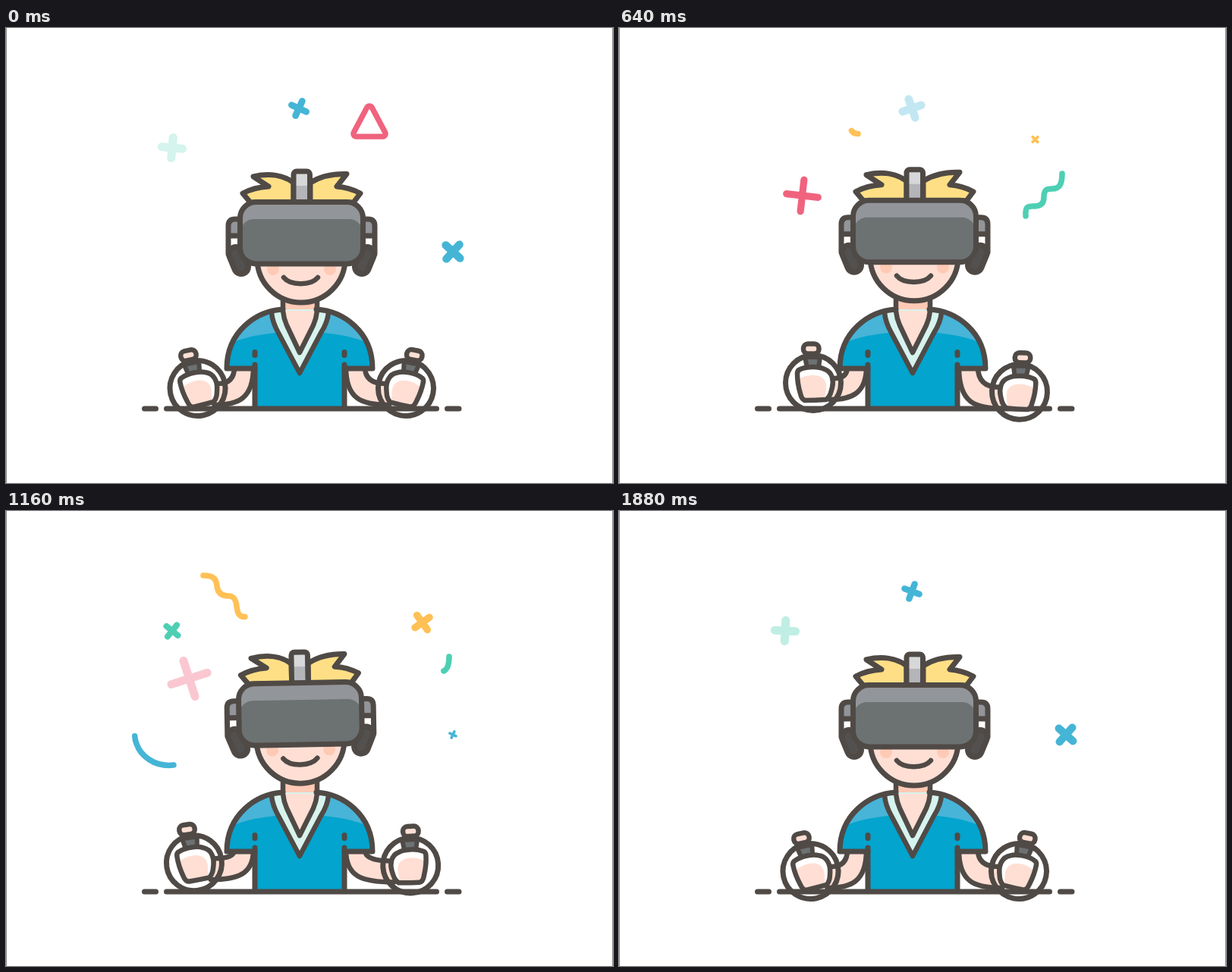
An HTML page with a canvas that plays this animation: 800x600 px, repeating every 1.92 s.

```html
<!DOCTYPE html>
<html lang="en">
<head>
<meta charset="utf-8">
<title>VR player</title>
<style>
html, body { margin: 0; width: 100%; height: 100%; overflow: hidden; background: #fff; }
canvas { display: block; width: 800px; height: 600px; }
</style>
</head>
<body>
<canvas id="stage" width="800" height="600"></canvas>
<script>
const ctx = document.getElementById('stage').getContext('2d');
const LOOP = 1920, STEP = 40, RAD = Math.PI / 180;
const INK = '#504a46', SKIN = '#ffdfd4', BLUSH = '#ffcab5', HAIR = '#ffdf85',
  SLATE = '#6c7172', STEEL = '#929599', SHIRT = '#03a4cd', SHIRT_LIGHT = '#48b4d7',
  MINT = '#d7f3ee', BLUE = '#45b5d6', RED = '#f0637e', GREEN = '#4ecfb3', YELLOW = '#ffc156';

const part = (t, from, span) => Math.min(1, Math.max(0, (t - from) / span));
const mix = (a, b, u) => a + (b - a) * u;
const easeOut = u => Math.sin(u * Math.PI / 2);
const easeBoth = u => (1 - Math.cos(u * Math.PI)) / 2;
const bump = (t, from, top, to) =>
  easeBoth(t < top ? part(t, from, top - from) : part(to - t, 0, to - top));

function paint(path, fill, line, width = 7) {
  const p = typeof path === 'string' ? new Path2D(path) : path;
  if (fill) { ctx.fillStyle = fill; ctx.fill(p); }
  if (line) { ctx.strokeStyle = line; ctx.lineWidth = width; ctx.stroke(p); }
}
function box(x, y, w, h, r) {
  const p = new Path2D();
  p.roundRect(x, y, w, h, r);
  return p;
}
function disc(x, y, r) {
  const p = new Path2D();
  p.arc(x, y, r, 0, 7);
  return p;
}
function group(draw) { ctx.save(); draw(); ctx.restore(); }
function mirror(axis, draw) {
  group(() => { ctx.translate(2 * axis, 0); ctx.scale(-1, 1); draw(); });
}
function bothSides(axis, draw) {
  draw();
  mirror(axis, draw);
}

// Key poses of a hand; the last one eases back into the first
const LEFT = [
  { time: 0, x: 252.5, y: 475, tilt: -12 },
  { time: 640, x: 256, y: 468, tilt: 0 },
  { time: 960, x: 254.5, y: 460, tilt: -3 },
  { time: 1420, x: 238, y: 470.5, tilt: -17 }
];
const RIGHT = [
  { time: 0, x: 527, y: 475, tilt: 11 },
  { time: 400, x: 521, y: 489, tilt: 2 },
  { time: 960, x: 539, y: 465, tilt: 1 },
  { time: 1420, x: 524.5, y: 471, tilt: -10 }
];
function pose(poses, t) {
  const i = poses.findLastIndex(p => p.time <= t);
  const a = poses[i], b = poses[(i + 1) % poses.length];
  const u = easeBoth(part(t, a.time, (b.time || LOOP - STEP) - a.time));
  return { x: mix(a.x, b.x, u), y: mix(a.y, b.y, u), tilt: mix(a.tilt, b.tilt, u) };
}

function arm(x, y) {
  const ux = x + 27, uy = y - 6, lx = x + 22, ly = y + 22;
  const upper = `M301 447 Q301 ${uy} ${ux} ${uy}`;
  const lower = `${lx} ${ly} C305 ${ly} 326 ${ly - 7} 326 447`;
  paint(`${upper} L${lower}Z`, SKIN);
  paint(`${upper} M${lower}`, null, INK, 6.5);
}

function hand({ x, y, tilt }, side) {
  group(() => {
    ctx.translate(x, y);
    ctx.rotate(tilt * RAD);
    ctx.scale(side, 1);
    paint(disc(0, 0, 36.5), null, INK);
    paint('M-11 -34 L9 -34 L7 -20 L-8 -20Z', SLATE, INK, 6);
    paint(box(-13, -51.5, 20.5, 13, 6), SKIN, INK, 6.5);
    const fist = new Path2D('M-17 -18 C-8 -22 8 -22 15 -18 C26 -14 27 -2 25 6 C23 14 22 18 17 22 ' +
      'Q2 23 -10 23 Q-15 23 -17 14 C-20 4 -21 -4 -21 -12 Q-21 -17 -17 -18Z');
    paint(fist, '#fff');
    group(() => {
      ctx.clip(fist);
      paint('M-24 30 L-20 -4 C-8 -13 15 -13 17 2 C18 8 16 12 14 30Z', SKIN);
    });
    paint(fist, null, INK, 6.5);
  });
}

function body() {
  paint('M365 340 H410 V400 H365Z', SKIN);
  paint('M365 340 H410 V372 Q387 380 365 372Z', BLUSH);
  paint('M365 345 V374 M410 345 V374', null, INK, 6.5);
  const shirt = new Path2D('M365 371 C330 373 291 400 291 449 L328 449 L328 501 L446 501 L446 449 ' +
    'L483 449 C483 400 444 373 410 371 L387 428Z');
  group(() => {
    ctx.clip(shirt);
    paint('M280 360 H500 V510 H280Z', SHIRT_LIGHT);
    paint('M285 422 Q315 402 387 400 Q459 402 489 422 V505 H285Z', SHIRT);
  });
  const outer = 'M350 375 Q351 388 359 402 L387 455 L415 402 Q424 388 425 375';
  const inner = 'M365 373 Q366 383 370 392 L387 428 L405 392 Q409 383 410 373';
  paint(outer + 'L410 371 H365Z', MINT);
  paint(inner, SKIN, INK, 6.5);
  paint(outer, null, INK, 6.5);
  bothSides(387, () => {
    paint('M365 371 C330 373 291 400 291 449 L328 449', null, INK);
    paint('M328 444 V501 M328 427.5 V431.5', null, INK);
  });
}

function head(t) {
  group(() => {
    ctx.translate(388, 362 - 5 * bump(t, 360, 960, 1400));
    ctx.rotate(-2.7 * RAD * bump(t, 960, 1430, 1840));
    ctx.translate(-388, -362);
    paint(disc(389, 304, 58), SKIN, INK);
    paint(disc(352, 318, 8), BLUSH);
    paint(disc(427, 318, 8), BLUSH);
    paint('M366 329 C375 340 402 340 411 329', null, INK, 6.5);
    paint('M379 204 C366 194 347 191 326 196 L346 209 Q327 210 312 218 L322 230 H379Z', HAIR, INK);
    paint('M401 204 C415 195 431 192 449 192.5 L436 209 Q452 210 467 218 L458 230 H401Z', HAIR, INK);
    bothSides(389.5, () => {
      paint('M309 252 H302 Q293 252 293 261 V274 H309Z', STEEL);
      paint('M309 252 H302 Q293 252 293 261 V298 M293 274 H309', null, INK);
      paint('M303 298 L310 315', null, INK, 26);
      paint('M303 298 L310 315', null, '#53514f', 11);
    });
    const strap = box(379, 189, 21.5, 46, 4);
    paint(strap, '#d6d7d8');
    paint('M379 208 H400.5 V235 H379Z', '#b4b5b8');
    paint(strap, null, INK);
    const visor = box(308.5, 229.5, 162, 81.5, 21);
    paint(visor, STEEL);
    group(() => {
      ctx.clip(visor);
      paint(box(309, 252, 161, 80, 18), SLATE);
    });
    paint(visor, null, INK);
  });
}

// Every cross pops up, turns while it grows, then fades
const CROSSES = [
  { x: 386, y: 106, color: BLUE, born: 1400, life: 1280, size: 13, from: -118, turn: 175 },
  { x: 589, y: 295, color: BLUE, born: 1120, size: 13, from: 15, turn: 28 },
  { x: 241.5, y: 221, color: RED, born: 120, size: 24.8, from: 95, turn: -105, thick: 0.44 },
  { x: 219, y: 158, color: GREEN, born: 840, size: 13.6, from: -68, turn: 150 },
  { x: 548.5, y: 147, color: YELLOW, born: 600, size: 13.5, from: -110, turn: 190 }
];
function cross({ x, y, color, born, life = 1160, size, from, turn, thick = 0.82 }, t) {
  const age = (t - born + LOOP) % LOOP / life;
  if (age <= 0 || age >= 1) return;
  const grow = Math.pow(age / 0.73, 0.35), r = size * Math.min(1, grow);
  group(() => {
    ctx.globalAlpha = part(1 - age, 0, 0.29);
    ctx.translate(x, y);
    ctx.rotate((from + turn * grow) * RAD);
    paint(`M${-r} 0 H${r} M0 ${-r} V${r}`, null, color, r * thick);
  });
}

// Ribbons draw themselves, then vanish from their tail
const RIBBONS = [
  { color: GREEN, born: 0, span: 560, leave: 640, gone: 1240, bend: 2,
    d: 'M536 248 C535 234 540 235 547 235 C556 235 560 231 560 223 C560 212 565 212 571 212 C580 212 584 207 584 192' },
  { color: YELLOW, born: 600, span: 560, leave: 1380, gone: 1770, bend: 2,
    d: 'M315 139.5 C306 140 305 133 304 126 C303 116 300 112 293 112 C284 112 279 108 278 99 C277 89 273 85 260 85' },
  { color: BLUE, born: 1100, span: 300, leave: 1160, gone: 1760, bend: 1,
    d: 'M221 335 C195 338 177 322 172 307 C168 297 170 290 172 285 C178 266 190 260 203 260 ' +
      'C220 260 231 272 231 287 C231 300 222 308 211 308 C200 308 193 301 193 291' }
];
for (const r of RIBBONS) {
  const p = document.createElementNS('http://www.w3.org/2000/svg', 'path');
  p.setAttribute('d', r.d);
  r.length = p.getTotalLength();
}
function ribbon({ color, born, span, leave, gone, bend, d, length }, t) {
  const tip = easeOut(part(t, born, span));
  const tail = Math.pow(part(t, leave, gone - leave), bend);
  if (tip - tail < 0.005) return;
  group(() => {
    ctx.setLineDash([(tip - tail) * length, 2 * length]);
    ctx.lineDashOffset = -tail * length;
    paint(d, null, color, 7.5);
  });
}

function triangle(t) {
  const u = easeOut(part(t, 0, 240)), size = mix(1, 1.59, u);
  group(() => {
    ctx.globalAlpha = 1 - part(t, 360, 240);
    ctx.translate(mix(479, 500, u), mix(127.5, 110.2, u));
    ctx.rotate(-18.5 * u * RAD);
    ctx.scale(size, size);
    // The wide stroke rounds the outside; the fill keeps the inside sharp
    const p = new Path2D('M0 -21 L17.5 12 L-17.5 12Z');
    paint(p, null, RED, 14.6);
    paint(p, '#fff');
  });
}

function draw(t) {
  ctx.fillStyle = '#fff';
  ctx.fillRect(0, 0, 800, 600);
  ctx.fillStyle = '#8c8c8c';
  ctx.fillRect(0, 0, 1, 600);
  ctx.fillRect(799, 0, 1, 600);
  ctx.lineCap = ctx.lineJoin = 'round';

  const left = pose(LEFT, t), right = pose(RIGHT, t);
  arm(left.x, left.y);
  mirror(387, () => arm(774 - right.x, right.y));
  body();
  paint('M182.5 502 H197.5 M211.5 502 H567.5 M581.5 502 H597', null, INK);
  hand(left, 1);
  hand(right, -1);
  head(t);
  if (t < 600) triangle(t);
  RIBBONS.forEach(r => ribbon(r, t));
  CROSSES.forEach(c => cross(c, t));
}

const begin = performance.now();
function tick() {
  const t = (performance.now() - begin) % LOOP;
  draw(Math.floor(t / STEP) * STEP);
  requestAnimationFrame(tick);
}
tick();
</script>
</body>
</html>
```
